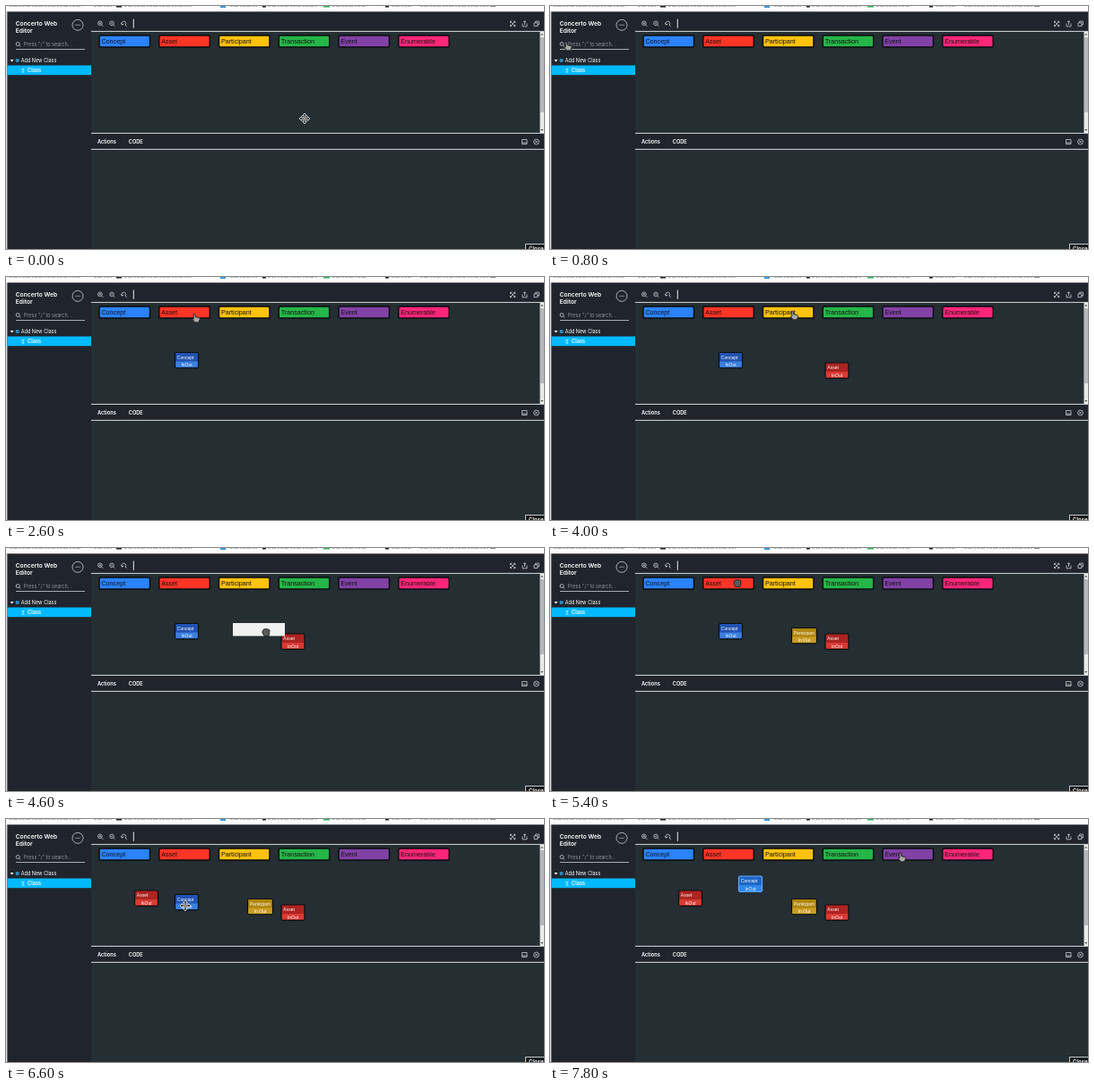
Write an HTML page that moves like this. It is 600 by 272 pixels and loops after 8000 ms.

```html
<!DOCTYPE html>
<html lang="en">
<head>
<meta charset="utf-8">
<title>Concerto Web Editor</title>
<style>
  html, body { margin: 0; width: 100%; height: 100%; overflow: hidden; background: #242e33; }
  svg { display: block; width: 600px; height: 272px; font: 5.7px Inter, sans-serif; fill: #fff; }
  .arial { font-family: "Liberation Sans", Arial, sans-serif; }
  .bold { font-weight: 600; }
  .icon { fill: none; stroke: #c9cdd0; stroke-width: .8; }
  .line { fill: none; stroke: #d5d9db; }
</style>
</head>
<body>
<svg viewBox="0 0 600 272">
  <defs>
    <g id="move" stroke-linejoin="round">
      <path id="arrows" d="M0-6l2.4 2.6H1V-1h2.400V-2.400L6 0 3.400 2.400V1H1v2.400h1.400L0 6l-2.400-2.600H-1V1h-2.400v1.400L-6 0l2.600-2.400V-1H-1v-2.400h-1.400z" fill="#30383c" stroke="#e4e6e7" stroke-width=".8"/>
      <circle r="1" fill="#e9a9a0"/>
    </g>
    <path id="hand" d="M-3-4.500q1-1 1.800 0l.6 3.200 4 .9q1 .4.8 1.600L2.700 4.800h-4L-4 1.400q0-1 1.500-.6z" fill="#a9a9a9" stroke="#222" stroke-width=".9" stroke-linejoin="round"/>
    <path id="fist" d="M-3-2.500q1-1.400 2-.5 1-1 2 0 1-.7 1.800.3 1.200-.1 1.200 1.400L3 4.500h-5L-4 1V-.5z" fill="#5b5b5b" stroke="#1b1b1b" stroke-width=".9" stroke-linejoin="round"/>
  </defs>

  <rect width="600" height="272" fill="#242e33"/>
  <path d="M0 6h600v22H95v244H0zM95 143h505v17H95z" fill="#20252d"/>

  <!-- browser strip -->
  <rect width="600" height="6.300" fill="#fdfdfd"/>
  <path d="M4 .3h80M98 .3h20M132 .3h75M250 .3h30M292 .3h55M364 .3h38M430 .3h22M462 .3h76" stroke="#999" stroke-width=".8" stroke-dasharray="3 1 5 2 2 1"/>
  <path d="M123 .5h6M286 .5h4M423 .5h4" stroke="#222" stroke-width="2"/>
  <path d="M239 .8h6" stroke="#3c9bd6" stroke-width="2.500"/>
  <path d="M354 .5h7" stroke="#35b35a" stroke-width="2"/>
  <path d="M540 .3h6" stroke="#777"/>
  <path d="M.7 6v266" stroke="#dcdee0" stroke-width="1.400"/>

  <!-- sidebar -->
  <g class="bold" font-size="6.700"><text x="10.700" y="22.300">Concerto Web</text><text x="10.700" y="29.700">Editor</text></g>
  <circle class="icon" cx="80" cy="21.300" r="6"/>
  <path d="M77.500 21.300h6" stroke="#ddd" stroke-width="1" stroke-dasharray="1 1"/>
  <circle class="icon" cx="13.200" cy="42.500" r="2"/><path class="icon" d="M14.700 44l1.600 1.600M11 48.500h77"/>
  <text x="19.800" y="44.900" fill="#8d949a" font-size="5.500">Press "/" to search...</text>
  <path d="M4.700 60h3.800L6.600 62.400z"/>
  <rect x="10.700" y="59" width="4" height="4" rx="1" fill="#2f86b8"/>
  <text x="16.800" y="63" font-size="5.500">Add New Class</text>
  <rect x="1.400" y="66.500" width="93.600" height="10.700" fill="#00b9ff"/>
  <path d="M17.500 70.600h3M17.500 74h3M19 70v4" stroke="#d5f3ff" stroke-width=".8"/>
  <text class="bold" x="24" y="74">Class</text>

  <!-- toolbars -->
  <g class="icon">
    <circle cx="104.800" cy="19.300" r="2.300"/><path d="M106.500 21l1.800 1.800M103.700 19.300h2.200M104.800 18.200v2.200"/>
    <circle cx="118" cy="19.300" r="2.300"/><path d="M119.700 21l1.800 1.800M116.900 19.300h2.200"/>
    <path d="M129.600 21.200a2.400 2.400 0 1 1 3.500 0M133 21l1.800 1.800M128.300 19l1.300 2.200 1.800-1.400"/>
    <path d="M562.500 19v-1.800h1.800M566 17.200h1.800V19M567.800 20.800v1.800H566M564.300 22.600h-1.800v-1.800M562.500 17.200l5.300 5.400M567.800 17.200l-5.300 5.400"/>
    <path d="M576 19.500v3.300h5v-3.300M578.500 21v-4.300M577 18.200l1.500-1.500 1.500 1.500"/>
    <path d="M589 18.800h3.800v3.800H589zM590.600 18.800v-1.700h3.800V21h-1.600"/>
    <path d="M575.500 149.500h5.500v5h-5.500zM575.500 153h5.500"/>
    <circle cx="591.500" cy="152" r="2.900"/><path d="M590.200 150.700l2.600 2.600M592.800 150.700l-2.600 2.600"/>
  </g>
  <path d="M142.300 14.500v10.300" stroke="#e8eaeb"/>
  <g class="bold"><text x="102" y="154">Actions</text><text x="136.700" y="154">CODE</text></g>
  <path class="line" d="M95 28.400h505M95 142.400h505M95 160.400h505"/>
  <rect x="595.500" y="28.500" width="4.500" height="113.500" fill="#e9eaea"/>
  <rect x="596" y="35" width="4" height="84" fill="#b4b8ba"/>
  <path d="M596.300 32.500h3l-1.500-1.800zM596.300 138h3l-1.500 1.800z" fill="#444"/>
  <rect x="579.500" y="266.500" width="24" height="9" fill="#15181b" stroke="#c8c8c8"/>
  <text class="bold" x="583" y="273.600" font-size="6">Close</text>

  <g id="palette" class="arial" font-size="7.200"></g>
  <g id="nodes" class="arial" font-size="5"></g>
  <rect id="ghost" width="58" height="14.500" fill="#f1f1f1"/>
  <use id="cursor"/>
</svg>
<script>
const STEP = 200, LOOP = 8000;
const $ = id => document.getElementById(id);

const palette = [
  ['Concept', '#2b83ff'], ['Asset', '#ff3527'], ['Participant', '#ffc20e'],
  ['Transaction', '#25b548'], ['Event', '#8141a5'], ['Enumerable', '#ff2678'],
];
$('palette').innerHTML = palette.map(([label, fill], i) => {
  const x = 104 + i * 66.75;
  return `<rect x="${x}" y="33" width="56.500" height="13" rx="1.500" fill="${fill}" stroke="#0a0c0e" stroke-width="1.500"/>
    <text x="${x + 2.4}" y="41.700" fill="#111">${label}</text>`;
}).join('');

// Dropped boxes: position, colours and the step at which each appears
const nodes = [
  { label: 'Concept', x: 188.5, y: 84.5, w: 26, head: '#2253b3', body: '#3b7fdf', from: 12 },
  { label: 'Asset', x: 307, y: 96, w: 26, head: '#ac2420', body: '#d93a33', from: 18 },
  { label: 'Participant', x: 269.5, y: 89.5, w: 28, head: '#b0860f', body: '#c99d24', from: 24 },
  { label: 'Asset', x: 143.5, y: 80, w: 26, head: '#ac2420', body: '#d93a33', from: 31 },
];
$('nodes').innerHTML = nodes.map(n => `<g>
  <rect class="head" width="${n.w}" height="17.300" rx="1.500" fill="${n.head}"/>
  <rect class="body" y="10" width="${n.w}" height="7.300" fill="${n.body}"/>
  <rect class="edge" width="${n.w}" height="17.300" rx="1.500" fill="none" stroke="#0b0d10" stroke-width="1.200"/>
  <text x="2.300" y="7" textLength="" font-size="${n.w > 26 ? 4.9 : 5}">${n.label}</text>
  <text x="${n.w / 2}" y="15.700" text-anchor="middle">${n.w > 26 ? 'In Out' : 'InOut'}</text>
</g>`.replace(' textLength=""', '')).join('');
const groups = [...$('nodes').children];

// Pointer path: step, x, y, shape ("drag" is a fist carrying the ghost)
const path = [
  [0, 333, 126, 'move'], [1, 405, 112, 'move'], [2, 300, 80, 'move'], [3, 120, 62, 'move'],
  [4, 20, 45, 'hand'], [5, 141, 44, 'hand'],
  [9, 153, 54, 'drag'], [10, 172, 72, 'drag'], [11, 190, 88, 'drag'],
  [12, 201, 93, 'move'], [13, 212, 46, 'hand'], [14, 199, 46, 'hand'],
  [15, 228, 49, 'drag'], [16, 265, 70, 'drag'], [17, 313, 100, 'drag'],
  [18, 320, 100, 'move'], [19, 297, 70, 'move'], [20, 272.5, 43, 'hand'],
  [21, 277, 50, 'drag'], [22, 300, 75, 'drag'], [23, 290, 94, 'drag'],
  [24, 283, 98, 'move'], [25, 240, 62, 'move'], [26, 209, 40, 'hand'],
  [27, 209, 39, 'fist'], [28, 200, 52, 'drag'], [29, 165, 75, 'drag'], [30, 142, 86, 'drag'],
  [31, 156, 88, 'move'], [32, 180, 94, 'move'], [33, 200, 97, 'move'],
  [34, 210, 88, 'move'], [35, 222, 77, 'move'], [36, 330, 58, 'move'],
  [37, 490, 42, 'hand'], [38, 412, 42, 'hand'], [39, 392.5, 43, 'hand'],
];
const place = (el, x, y) => el.setAttribute('transform', `translate(${x} ${y})`);
const show = (el, on) => el.setAttribute('visibility', on ? 'visible' : 'hidden');

function draw(step) {
  const [, x, y, shape] = path.findLast(p => p[0] <= step);
  $('cursor').setAttribute('href', '#' + (shape === 'drag' ? 'fist' : shape));
  place($('cursor'), x, y);
  show($('ghost'), shape === 'drag');
  place($('ghost'), x - 37, y - 10);

  // The first box is dragged up and stays selected
  const pull = Math.min(Math.max(step - 33, 0), 2) / 2;
  nodes.forEach((n, i) => {
    const moved = i ? 0 : pull;
    place(groups[i], n.x + 22 * moved, n.y - 20.5 * moved);
    show(groups[i], step >= n.from);
  });
  const paint = (part, name, value) => groups[0].querySelector(part).setAttribute(name, value);
  paint('.head', 'fill', pull ? '#1f66c6' : nodes[0].head);
  paint('.body', 'fill', pull ? '#2f86ea' : nodes[0].body);
  paint('.edge', 'stroke', pull ? '#62a9f0' : '#0b0d10');
}

function tick() {
  draw(Math.floor(performance.now() % LOOP / STEP));
  requestAnimationFrame(tick);
}
tick();
</script>
</body>
</html>
```
